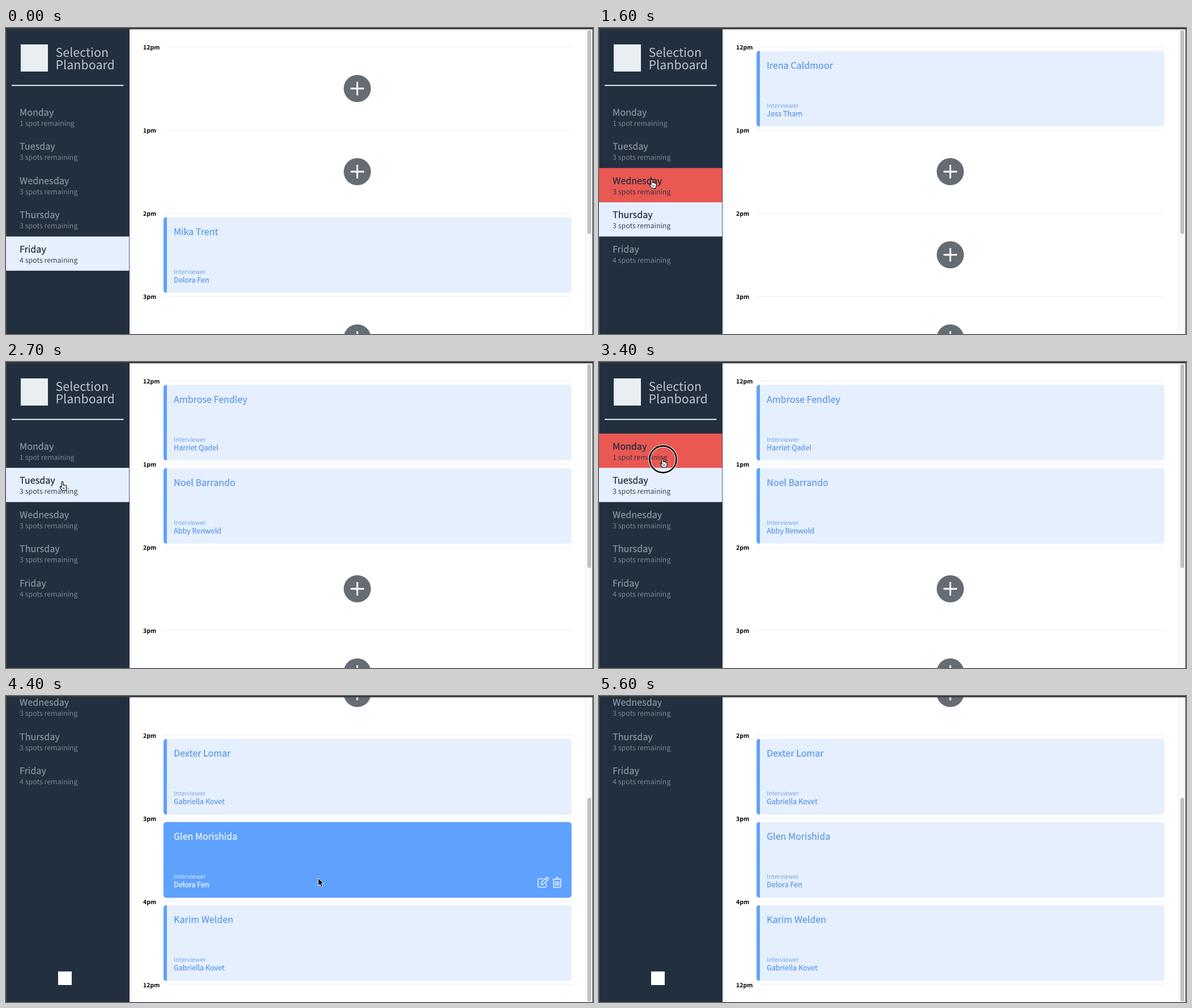
An HTML page for the animation above (6000 ms loop, 1036x541 px).

```html
<!DOCTYPE html>
<html lang="en">
<head>
<meta charset="utf-8">
<title>Day planner</title>
<style>
  html, body { margin: 0; width: 100%; height: 100%; overflow: hidden; background: #fff; }
  svg { display: block; width: 100vw; height: 100vh; }
  text {
    font-family: "Noto Sans CJK JP", "Noto Sans CJK SC", "Noto Sans CJK KR", "Open Sans", sans-serif;
    text-rendering: geometricPrecision;
  }
  .brand { font-size: 21.5px; font-weight: 300; fill: #d9dfe6; fill-opacity: .85; }
  /* a hairline stroke gives the medium weight */
  .day, .guest, .host { stroke: currentColor; stroke-width: .3px; fill: currentColor; }
  .day { font-size: 16.2px; }
  .spots { font-size: 12.4px; font-weight: 300; fill: currentColor; fill-opacity: .88; }
  .hour { font-size: 10.5px; font-weight: 600; fill: #000; }
  .guest { font-size: 16.1px; }
  .label { font-size: 10.6px; font-weight: 300; fill: currentColor; fill-opacity: .88; }
  .host { font-size: 12.6px; }
</style>
</head>
<body>
<svg id="stage" viewBox="0 0 1036 541" preserveAspectRatio="none"></svg>
<script>
const stage = document.getElementById('stage');
const LOOP = 6000, STEP = 100, SCROLL = 258.5;
const DARK = '#222f3e', DIM = '#89929d', RED = '#ea5853';
const PALE = '#e6effd', BLUE = '#5ea1ff', INK = '#609ceb';
const SIDE = 218, ROW_TOP = 126.6, ROW_H = 60.5, HOUR_TOP = 33.5, HOUR_H = 147;

const hours = ['12pm', '1pm', '2pm', '3pm', '4pm', '12pm'];

// Bookings: slot index -> [guest, host]
const days = [
  { name: 'Monday', spots: '1 spot', slots: {
    0: ['Nilou Ar', 'Joss Tham'],
    2: ['Dexter Lomar', 'Gabriella Kovet'],
    3: ['Glen Morishida', 'Delora Fen'],
    4: ['Karim Welden', 'Gabriella Kovet'] } },
  { name: 'Tuesday', spots: '3 spots', slots: {
    0: ['Ambrose Fendley', 'Harriet Qadel'],
    1: ['Noel Barrando', 'Abby Renwold'] } },
  { name: 'Wednesday', spots: '3 spots', slots: {
    1: ['Petra Holden-Sparr', 'Gustav Pell'],
    2: ['Elise Garnaud', 'Bethany Rho'] } },
  { name: 'Thursday', spots: '3 spots', slots: {
    0: ['Irena Caldmoor', 'Joss Tham'] } },
  { name: 'Friday', spots: '4 spots', slots: {
    2: ['Mika Trent', 'Delora Fen'] } }
];

// Pointer path: [time, x, y]
const path = [
  [100, 624, 512], [600, 270, 490], [800, 200, 400], [900, 162, 346], [1000, 152, 334],
  [1400, 152, 334], [1600, 94, 268], [2100, 94, 268], [2400, 100, 212], [2800, 100, 212],
  [3200, 113, 171], [3700, 113, 171], [4100, 549, 319], [4200, 549, 319], [4400, 551, 322],
  [4700, 551, 322], [4900, 1012, 330]
];
const clicks = [1100, 1700, 2600, 3400];
// Selected day from each time on
const picks = [[0, 4], [1200, 3], [1800, 2], [2700, 1], [3500, 0]];

const rect = (x, y, w, h, fill, more = '') =>
  `<rect x="${x}" y="${y}" width="${w}" height="${h}" fill="${fill}" ${more}/>`;
const text = (cls, x, y, s) => `<text class="${cls}" x="${x}" y="${y}">${s}</text>`;
const tinted = (color, content) => `<g color="${color}">${content}</g>`;

function pointerAt(t) {
  for (let i = 1; i < path.length; i++) {
    const [t0, x0, y0] = path[i - 1], [t1, x1, y1] = path[i];
    if (t >= t0 && t <= t1) {
      const k = (t - t0) / (t1 - t0);
      return { x: x0 + (x1 - x0) * k, y: y0 + (y1 - y0) * k };
    }
  }
  return null;
}

function sidebar(selected, hovered) {
  let out = rect(0, 0, SIDE, 1000, DARK) + rect(0, 0, 1, 1000, '#4a5461')
    + rect(26, 29, 48, 48, '#e8eef2')
    + text('brand', 87.5, 51, 'Selection') + text('brand', 87.5, 72.5, 'Planboard')
    + rect(10, 100.5, 197.5, 2, '#eaf0f6')
    + rect(92, 745.5, 24, 24, '#fff');
  days.forEach((d, i) => {
    const y = ROW_TOP + i * ROW_H;
    let ink = DARK;
    if (i === selected) out += rect(0, y, SIDE - .7, ROW_H, i === 0 ? '#f1f1f1' : PALE);
    else if (i === hovered) out += rect(0, y, SIDE - .7, ROW_H, RED);
    else ink = DIM;
    out += tinted(ink, text('day', 24, y + 28, d.name)
      + text('spots', 24, y + 46, d.spots + ' remaining'));
  });
  return out;
}

const tools = y => `<g fill="none" stroke="#e9f1ff" stroke-width="1.6" stroke-linejoin="round" transform="translate(938 ${y})">
  <path d="M10 3H2.5Q1 3 1 4.5V16.5Q1 18 2.5 18H14Q15.5 18 15.5 16.5V11"/>
  <path d="M7 9.5L15.5 1Q17 0 18.5 1.5T19 4.5L10.5 13L6.5 13.5Z M13.5 3L17 6.5"/>
  <path d="M27 4H42.5 M32 4L33 1.2H36.5L37.5 4 M28.5 4V16.5Q28.5 18.5 30 18.5H39.5Q41 18.5 41 16.5V4 M32 7.5V15.5 M34.75 7.5V15.5 M37.5 7.5V15.5"/>
</g>`;

function card(y, [guest, host], hot) {
  return `<path d="M284 ${y}h-1q-5 0-5 5v123.5q0 5 5 5h1z" fill="#61a2fb"/>`
    + `<path d="M284 ${y}H993q5 0 5 5v123.5q0 5-5 5H284z" fill="${PALE}"/>`
    + (hot ? rect(278, y, 720, 133.5, BLUE, 'rx="5" stroke="#8fb2e6" stroke-width=".6"') : '')
    + tinted(hot ? '#f1f6ff' : INK, text('guest', 296, y + 31, guest)
      + text('label', 296, y + 100, 'Interviewer')
      + text('host', 296, y + 115, host))
    + (hot ? tools(y + 97) : '');
}

const addButton = y => `<circle cx="620" cy="${y}" r="24" fill="#666c74"/>
  <path d="M608 ${y}h24M620 ${y - 12}v24" stroke="#fff" stroke-width="2.8"/>`;

function schedule(selected, p, scroll) {
  return hours.map((h, i) => {
    const y = HOUR_TOP + i * HOUR_H, x = h === '12pm' ? 283 : 277;
    const out = text('hour', 242, y + 4.5, h) + rect(x, y - .5, 998 - x, 1, '#e8f0f6');
    if (i === hours.length - 1) return out;
    const booking = days[selected].slots[i], top = y + 7;
    const hot = p && p.x > 278 && p.x < 998 && p.y + scroll > top && p.y + scroll < top + 133.5;
    return out + (booking ? card(top, booking, hot) : addButton(y + 73.5));
  }).join('');
}

function frame(scroll) {
  return rect(1023, 0, 12, 541, '#fbfbfb') + rect(1022.5, 0, 1, 541, '#e9edf2')
    + rect(1026, 4 + 176 * scroll / SCROLL, 7, 360, '#c1c1c1', 'rx="3.5"')
    + rect(1035, 0, 1, 541, '#2b2f36')
    + rect(0, 0, 1036, 2.3, '#37383b');
}

function pointer(p, t) {
  const shape = p.x < SIDE
    ? `<path d="M-2 7V.8Q-2-.6-.7-.6T.7.8V5.5Q2 4.7 3 6Q4.3 5.3 5.2 6.7Q7 6.3 7 8V11.5Q6.5 13.5 5.5 15.5H-1Q-2.5 12.5-4.5 10.2Q-5.3 8.5-4.3 7.9Q-3 7.7-2 9.3Z" fill="#fff" stroke="#000" stroke-width="1.1"/>
       <path d="M.9 9.5V13M2.9 9.5V13" stroke="#000" stroke-width=".8"/>`
    : `<path d="M0 0V13.5L3.2 10.6L5.3 15.4L7.8 14.3L5.7 9.7H9.8Z" fill="#000" stroke="#fff" stroke-width="1"/>`;
  const ring = clicks.includes(t)
    ? `<g fill="none"><circle cy="1" r="23.6" stroke="#fff" stroke-width="4.6"/><circle cy="1" r="23.6" stroke="#000" stroke-width="2.6"/></g>`
    : '';
  return `<g transform="translate(${p.x} ${p.y})">${ring}${shape}</g>`;
}

function render(t) {
  const p = pointerAt(t);
  const scroll = SCROLL * Math.min(1, Math.max(0, (t - 4200) / 200));
  const selected = picks.filter(([at]) => at <= t).pop()[1];
  const hovered = p && p.x < SIDE ? Math.floor((p.y + scroll - ROW_TOP) / ROW_H) : -1;
  stage.innerHTML = rect(0, 0, 1036, 541, '#fff') + rect(SIDE, 0, 3, 541, '#e9effb')
    + `<g transform="translate(0 ${-scroll})">${sidebar(selected, hovered)}${schedule(selected, p, scroll)}</g>`
    + frame(scroll) + (p ? pointer(p, t) : '');
}

const start = performance.now();
let shown = -1;
function tick() {
  const t = Math.floor((performance.now() - start) % LOOP / STEP) * STEP;
  if (t !== shown) render(shown = t);
  requestAnimationFrame(tick);
}
tick();
</script>
</body>
</html>
```
